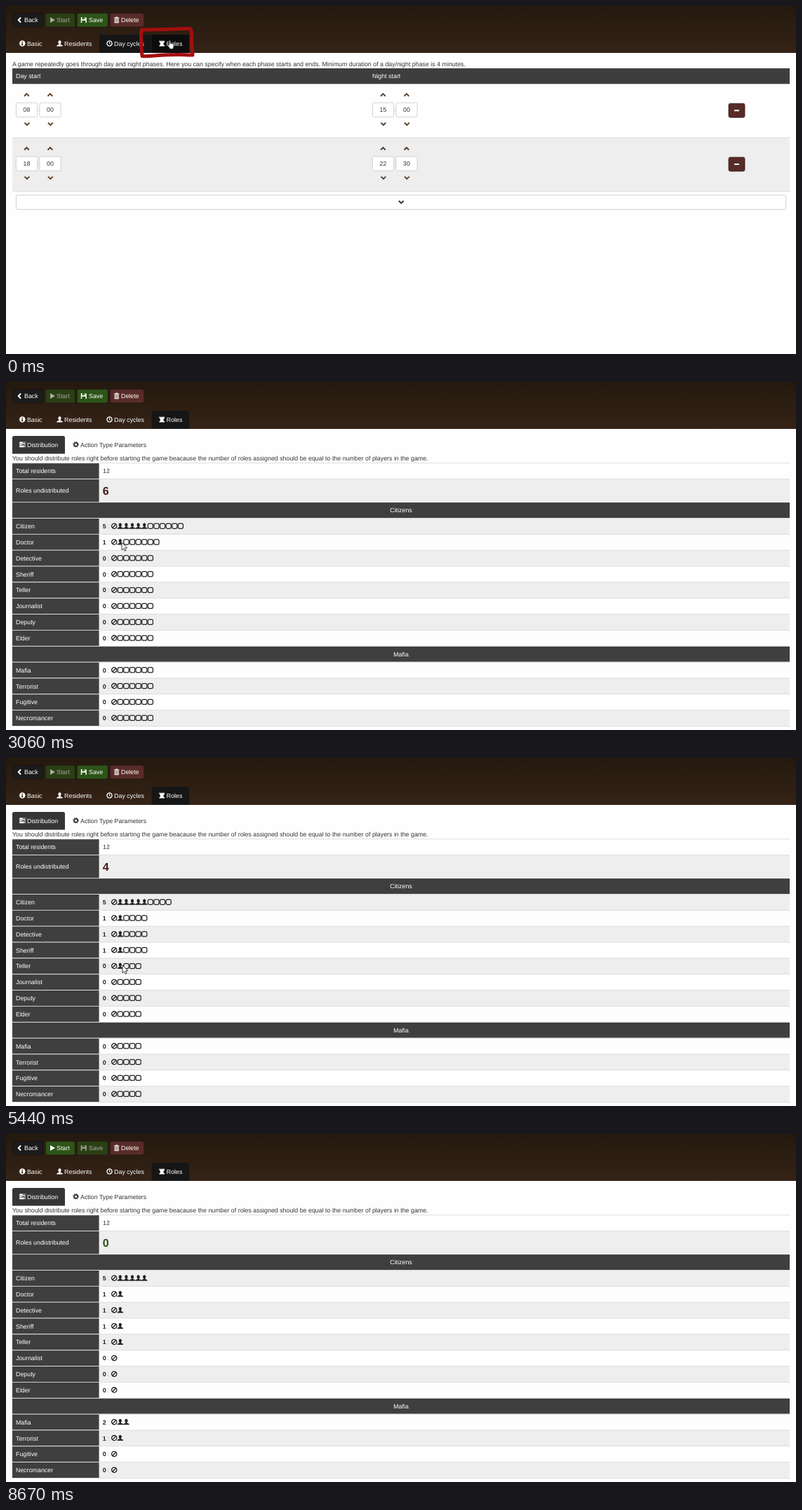
An HTML page for the animation above (9520 ms loop, 1126 px wide and 497 px high).

```html
<!DOCTYPE html>
<html lang="en">
<head>
<meta charset="utf-8">
<title>Role distribution</title>
<style>
html, body { margin: 0; width: 100%; height: 100%; overflow: hidden; background: #fefefe; }
svg { display: block; width: 1126px; height: 497px; }
text { font: 8.85px "Liberation Sans", Arial, sans-serif; fill: #333; text-rendering: geometricPrecision; white-space: pre; }
.w { fill: #fff; }
.mid { text-anchor: middle; }
.b { font-weight: bold; fill: #222; }
.total { font-size: 16px; font-weight: bold; }
</style>
</head>
<body>
<svg id="stage" viewBox="0 0 1126 497">
  <defs>
    <linearGradient id="bar" x2="0" y2="1">
      <stop stop-color="#24190f"/><stop offset="1" stop-color="#352316"/>
    </linearGradient>
    <g id="ban" fill="none" stroke="#222" stroke-width="1.3"><circle r="3.6"/><path d="M-2.5 2.5L2.5-2.5"/></g>
    <rect id="slot" x="-3.55" y="-3.55" width="7.1" height="7.1" rx="1.9" fill="none" stroke="#222" stroke-width="1.25"/>
    <path id="user" d="M0-4.2C1.6-4.2 2.2-3.2 2.1-1.7C2-.5 1.5.2 1.1.7V1.4L3.7 2.5Q4.3 2.8 4.3 4H-4.3Q-4.3 2.8-3.7 2.5L-1.1 1.4V.7C-1.5.2-2-.5-2.1-1.7C-2.2-3.2-1.6-4.2 0-4.2Z"/>
    <path id="up" d="M-3.4 1.7L0-1.6L3.4 1.7" fill="none" stroke-width="2"/>
    <path id="down" d="M-3.4-1.7L0 1.6L3.4-1.7" fill="none" stroke-width="2"/>
    <path id="left" d="M1.6-3.5L-1.7 0L1.6 3.5" fill="none" stroke="#fff" stroke-width="2"/>
    <path id="play" d="M-3-4L4 0L-3 4Z"/>
    <path id="disk" fill-rule="evenodd" d="M-4-4H2.8L4-2.8V4H-4ZM-2.2-4V-1H2.2V-4ZM-2.6 .8V4H2.6V.8ZM.4-3.6H1.5V-1.5H.4Z"/>
    <path id="trash" fill-rule="evenodd" d="M-3.6-3.4H-1.4V-4.4H1.4V-3.4H3.6V-2.2H-3.6ZM-3-1.6H3V4.2H-3ZM-1.9-.7V3.2H-1.2V-.7ZM-.35-.7V3.2H.35V-.7ZM1.2-.7V3.2H1.9V-.7Z"/>
    <g id="info"><circle r="4.2" fill="#fff"/><path d="M-.8-2.8H.8V-1.5H-.8ZM-1.3-.8H.8V2H1.4V2.8H-1.4V2H-.7V0H-1.3Z" fill="#2d1e13"/></g>
    <g id="clock" fill="none" stroke="#fff" stroke-width="1.3"><circle r="3.6"/><path d="M0-2.4V.2L1.7 1.1" stroke-width="1"/></g>
    <path id="rook" d="M-3.6-4H-2V-3H-.8V-4H.8V-3H2V-4H3.6V-1.6L2.3-.8V1.6L3.8 3V4.1H-3.8V3L-2.3 1.6V-.8L-3.6-1.6Z"/>
    <path id="tasks" d="M-4.2-3.8H4.2V-1.6H-4.2ZM-4.2-1H4.2V1.2H-4.2ZM-4.2 1.8H4.2V4H-4.2ZM.8-3.2V-2.2H3.6V-3.2ZM-1.2-.4V.6H3.6V-.4ZM1.8 2.4V3.4H3.6V2.4Z" fill-rule="evenodd"/>
    <g id="gear" fill="none" stroke="#333"><circle r="2.4" stroke-width="1.6"/><circle r="3.6" stroke-width="1.3" stroke-dasharray="1.5 1.327"/></g>
    <path id="arrow" d="M0 0V11L2.5 8.7L4.2 12.3L6 11.5L4.4 8H7.8Z" fill="#fff" stroke="#111" stroke-width=".8"/>
    <path id="hand" d="M1.6 1Q2.4-.1 3.2 1V5Q4.2 4.2 5 5.2Q6 4.6 6.6 5.6Q7.9 5.2 8.1 6.6V9.4L7 12.8H2.6L1.8 11L-.9 7.8Q-.6 6.4.6 6.9L1.6 7.8Z" fill="#fff" stroke="#111" stroke-width=".7"/>
  </defs>
  <rect width="1126" height="67" fill="url(#bar)"/>
  <g id="buttons"></g>
  <g id="tabs"></g>
  <g id="cycles"></g>
  <g id="roles"></g>
  <g id="cursor"></g>
</svg>
<script>
const LOOP = 9520, STEP = 170, OPEN = 1190, HIDE = 8670, PLAYERS = 12, PITCH = 8.61, ICON_X = 154.2;
const names = ['Citizen', 'Doctor', 'Detective', 'Sheriff', 'Teller', 'Journalist', 'Deputy', 'Elder',
  'Mafia', 'Terrorist', 'Fugitive', 'Necromancer'];

// time, role, amount
const clicks = [[2210, 0, 5], [3060, 1, 1], [4080, 2, 1], [4760, 3, 1], [5610, 4, 1], [6630, 8, 2], [7650, 9, 1]];

// time, x, y of the pointer tip
const path = [[1190, 232, 49], [1360, 232, 49], [2040, 196, 205], [2210, 196, 205], [2720, 165, 228],
  [3060, 165, 229], [3740, 165, 252], [4080, 165, 252], [4420, 163, 274], [4760, 163, 274],
  [5100, 165, 293], [5270, 165, 293], [5440, 166, 296], [5610, 166, 296], [6290, 171, 411], [6460, 171, 411],
  [6630, 167, 427], [7310, 163, 434], [7820, 163, 434], [8160, 158, 419], [8330, 155, 405], [8500, 154, 400]];

const $ = id => document.getElementById(id);
const text = (x, y, s, cls = '') => `<text x="${x}" y="${y}" class="${cls}">${s}</text>`;
const rect = (x, y, w, h, fill, more = '') => `<rect x="${x}" y="${y}" width="${w}" height="${h}" fill="${fill}" ${more}/>`;
const icon = (id, x, y, more = '') => `<use href="#${id}" x="${x}" y="${y}" ${more}/>`;
const line = y => rect(9, y, 1108, 0.8, '#d8d8d8');
const rowY = i => 206 + 22.84 * (i < 8 ? i : i + 1);

function button(x, w, fill, glyph, gx, label, tx, off) {
  return `<g ${off ? 'opacity=".62"' : ''}>` +
    rect(x + .4, 10.4, w - .8, 19.4, fill, 'rx="2.4" stroke="#000" stroke-opacity=".3" stroke-width=".8"') +
    icon(glyph, gx, 20, 'fill="#fff"') + text(tx, 23.3, label, 'w') + '</g>';
}

function buttons(saved) {
  return button(9, 44, '#1b1b1c', 'left', 19.5, 'Back', 26) +
    button(56, 42.5, '#2d5518', 'play', 66, 'Start', 72, !saved) +
    button(101, 44.5, '#2d5518', 'disk', 110.8, 'Save', 118, saved) +
    button(148, 49, '#592b28', 'trash', 157.7, 'Delete', 164);
}

function tabs(open) {
  const tab = (x, w, fill) => `<path d="M${x} 67V43.5Q${x} 41 ${x + 2.5} 41H${x + w - 2.5}Q${x + w} 41 ${x + w} 43.5V67Z" fill="${fill}"/>`;
  const label = (glyph, x, s) => icon(glyph, x, 53.5, 'fill="#fff"') + text(x + 6.6, 56.7, s, 'w');
  return (open ? '' : tab(133, 74, '#161617')) + tab(207.5, 53.5, open ? '#161617' : '#0d0c0c') +
    label('info', 23.3, 'Basic') + label('user', 76.5, 'Residents') +
    label('clock', 147.5, 'Day cycles') + label('rook', 222.2, 'Roles');
}

function timeField(x, y, h, m) {
  return [[x, h], [x + 33.5, m]].map(([bx, v]) =>
    icon('up', bx + 15.4, y - 21, 'stroke="#5a432f"') + icon('down', bx + 15.9, y + 20.5, 'stroke="#5a432f"') +
    rect(bx + .4, y - 9.8, 30.2, 20.4, '#fff', 'rx="2.4" stroke="#c8c8c8" stroke-width=".8"') +
    text(bx + 15.5, y + 3.3, v, 'mid')).join('') +
    `<g opacity=".4">${text(x + 31, y + 3, ':')}</g>`;
}

function cycleRow(y, from, to) {
  return timeField(14, y, from, '00') + timeField(522, y, ...to) +
    rect(1030, y - 8.8, 23, 20, '#562b28', 'rx="2.4" stroke="#3c1b19" stroke-width=".8"') +
    rect(1038, y + .2, 7, 2, '#fff', 'rx=".5"');
}

$('cycles').innerHTML =
  text(9, 85.8, 'A game repeatedly goes through day and night phases. Here you can specify when each phase starts and ends. Minimum duration of a day/night phase is 4 minutes.') +
  rect(9, 89, 1108, 22.3, '#3e3e3e') + text(14, 103.2, 'Day start', 'w') + text(522, 103.2, 'Night start', 'w') +
  rect(9, 188, 1108, 77, '#eee') + line(187.6) + line(264.6) +
  cycleRow(148, '08', ['15', '00']) + cycleRow(224.8, '18', ['22', '30']) +
  rect(14.4, 270, 1097.2, 20.6, '#fff', 'rx="2.4" stroke="#c4c4c4" stroke-width=".8"') +
  icon('down', 563.3, 280, 'stroke="#333"') +
  '<path d="M193 34Q226 34 262 32Q266 33 264.5 50L266 70Q240 69 217 70.5Q205 72 194 71.5Q192 52 193 34Z" fill="none" stroke="#a30f0f" stroke-width="5" stroke-linejoin="round"/>';

function roleTable() {
  const head = (y, s) => rect(9, y - 11.1, 1108, 22, '#3f3f3f') + text(563, y + 3.1, s, 'mid w');
  const row = (y, h, s, grey) => (grey ? rect(9, y - h / 2, 1108, h, '#eee') : '') + line(y - h / 2 - .4) +
    rect(9, y - h / 2 + .4, 123.6, h - .9, '#3f3f3f') + text(14, y + 3.1, s, 'w');
  return '<path d="M9 102.6V79.5Q9 77 11.5 77H81.5Q84 77 84 79.5V102.6Z" fill="#363637"/>' +
    icon('tasks', 23.4, 89.3, 'fill="#fff"') + text(30, 92.6, 'Distribution', 'w') +
    icon('gear', 99.6, 89.3) + text(106, 92.6, 'Action Type Parameters') +
    text(9, 112, 'You should distribute roles right before starting the game beacause the number of roles assigned should be equal to the number of players in the game.') +
    row(127.2, 22.8, 'Total residents') + text(138, 130.4, PLAYERS) +
    row(155.2, 33.2, 'Roles undistributed', true) +
    head(183.2, 'Citizens') + head(388.8, 'Mafia') +
    names.map((s, i) => row(rowY(i), 22.84, s, i % 2 === (i < 8 ? 0 : 1))).join('') + line(491);
}
$('roles').innerHTML = roleTable() + '<g id="counts"></g>';

function pointer(t) {
  if (t < OPEN || t >= HIDE) return null;
  const i = path.findIndex(p => p[0] > t);
  if (i < 0) return path[path.length - 1].slice(1);
  const [t0, x0, y0] = path[i - 1], [t1, x1, y1] = path[i], k = (t - t0) / (t1 - t0);
  return [x0 + (x1 - x0) * k, y0 + (y1 - y0) * k];
}

function counts(t, tip) {
  const given = names.map(() => 0);
  clicks.forEach(([at, role, n]) => { if (t >= at) given[role] = n; });
  const left = PLAYERS - given.reduce((a, b) => a + b);
  let out = `<text x="137.8" y="160.6" class="total" style="fill:${left ? '#471b19' : '#2d4f19'}">${left}</text>`;
  given.forEach((n, i) => {
    const y = rowY(i), slots = n + left;
    let filled = n;
    if (tip && Math.abs(tip[1] - y) <= 4.5) {
      const over = Math.floor((tip[0] - ICON_X) / PITCH + .5);
      if (over >= 0 && over <= slots) filled = over;
    }
    out += text(137.8, y + 3.1, n, 'b') + `<g opacity=".55">${text(144.8, y + 3.1, ':')}</g>` + icon('ban', ICON_X, y - .3);
    for (let k = 1; k <= slots; k++)
      out += icon(k <= filled ? 'user' : 'slot', ICON_X + PITCH * k, y - .3, k <= filled ? 'fill="#222"' : '');
  });
  return out;
}

function draw(t) {
  const open = t >= OPEN, tip = pointer(t);
  $('buttons').innerHTML = buttons(t >= 7650);
  $('tabs').innerHTML = tabs(open);
  $('cycles').style.display = open ? 'none' : '';
  $('roles').style.display = open ? '' : 'none';
  if (open) $('counts').innerHTML = counts(t, tip);
  $('cursor').innerHTML = !open ? icon('hand', 231, 48.5) : tip ? icon('arrow', ...tip) : '';
}

let last = -1;
function tick() {
  const t = Math.floor(performance.now() % LOOP / STEP) * STEP;
  if (t !== last) draw(last = t);
  requestAnimationFrame(tick);
}
tick();
</script>
</body>
</html>
```
